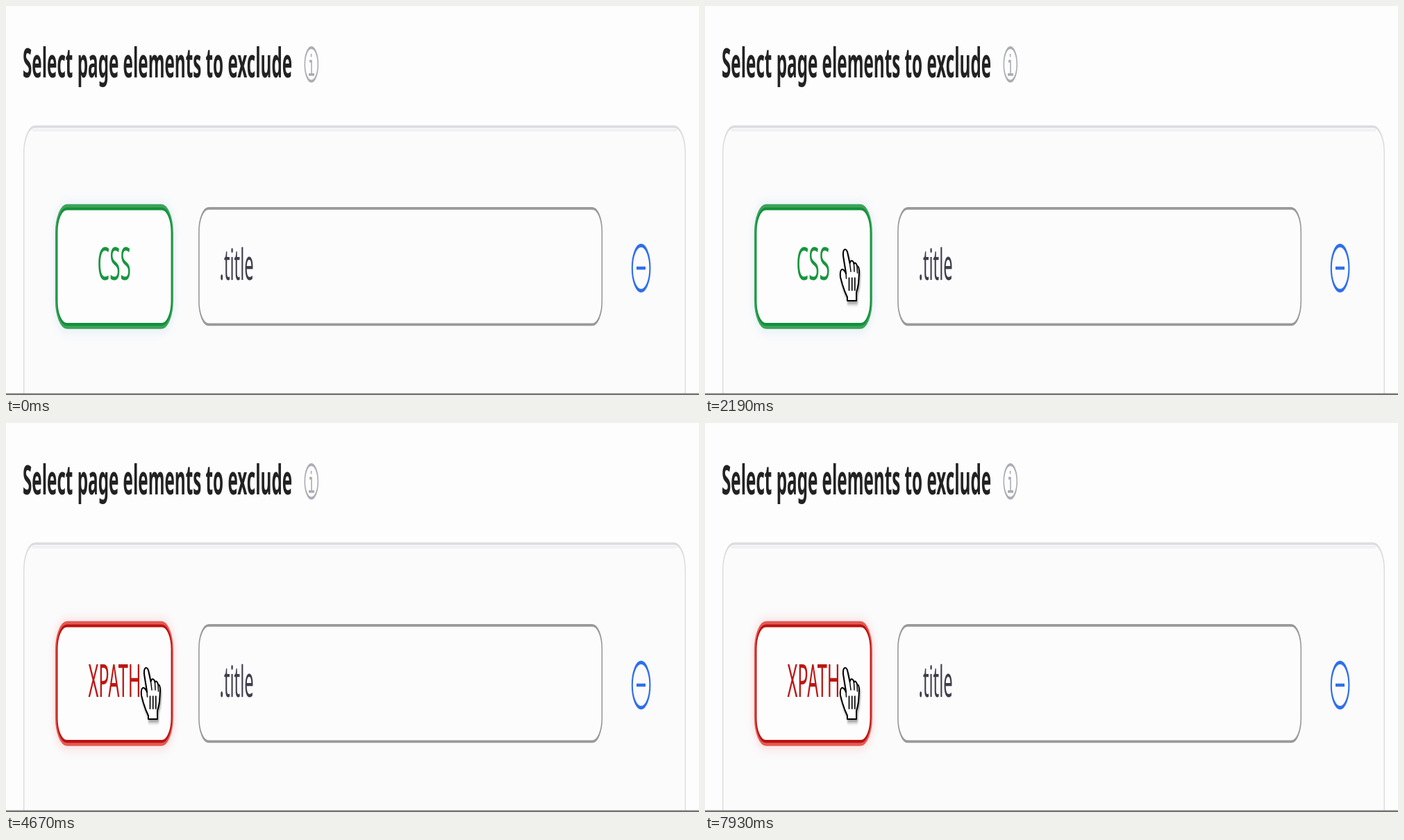
An HTML page for the animation above (8 s loop, 998 by 561 pixels).

```html
<!DOCTYPE html>
<html lang="en">
<head>
<meta charset="utf-8">
<title>Exclude elements</title>
<style>
  html, body { margin: 0; width: 100%; height: 100%; overflow: hidden; background: #fdfdfd; }
  svg { display: block; width: 100%; height: 100%; }
  text { font-family: "Noto Sans", "Open Sans", sans-serif; }
</style>
</head>
<body>
<svg viewBox="0 0 998 561" preserveAspectRatio="none">
  <defs>
    <filter id="soft" x="-20%" y="-40%" width="140%" height="180%">
      <feGaussianBlur stdDeviation="4.5 3.5"/>
    </filter>
    <filter id="drop" x="-50%" y="-30%" width="200%" height="170%">
      <feDropShadow dx="1" dy="4" stdDeviation="1.3 2.4" flood-opacity=".4"/>
    </filter>
  </defs>
  <rect width="998" height="561" fill="#fdfdfd"/>

  <!-- The interface is squeezed sideways, so boxes share one vertical scale -->
  <g transform="scale(1 2.4)" fill="none">
    <rect x="25.7" y="72.5" width="952.6" height="200" rx="16" fill="#fbfbfc" stroke="#dcdce0" stroke-width="1.5"/>
    <path d="M38 74.600H966" stroke="#f1f1f4" stroke-width="1.6"/>
    <rect x="277.9" y="121.6" width="580.4" height="69.8" rx="14" fill="#fcfcfd" stroke="#999" stroke-width="1.6"/>
    <ellipse cx="439.8" cy="35.1" rx="9.5" ry="10.1" stroke="#abadb5" stroke-width="1.6"/>
    <path d="M437 33.2H440V41M436 41.2H444M439.6 28.8V30.6" stroke="#abadb5" stroke-width="1.6"/>
    <ellipse cx="914.6" cy="157.5" rx="12.8" ry="13.6" stroke="#2f6fec" stroke-width="2.1"/>
    <path d="M908 157.5H921" stroke="#2f6fec" stroke-width="1.9"/>
    <rect id="glow" x="69" y="118.5" width="174" height="77" rx="18" filter="url(#soft)" opacity=".26"/>
    <rect x="73" y="121" width="166" height="71.5" rx="15" fill="#fdfdfd"/>
    <rect id="outer" x="72.2" y="120.4" width="167.4" height="72.4" rx="16" stroke-width="2.6"/>
    <rect id="inner" x="73.6" y="121.9" width="164.8" height="69.4" rx="14" stroke-width="1.7"/>
  </g>

  <g id="labels"></g>
  <rect y="558.6" width="998" height="2.4" fill="#737373"/>

  <g id="cursor">
    <path id="arrow" filter="url(#drop)" d="M0 0V47L4.5 39L9 68L14.5 63L10 38H16.5Z"
      fill="#000" stroke="#fff" stroke-width="1.4"/>
    <g id="hand" filter="url(#drop)" stroke="#000" stroke-linejoin="round" stroke-linecap="round">
      <path d="M-5 35L-9 10Q-9.500 2 -6.500 1Q-3.500 1 -2.500 7L.5 21Q3 14 6 20L6.500 22Q9 18 11 25Q14 25 14 34L13 50Q12 57 10 63V75H-3V70Q-7 62 -10 52L-13 41Q-14 32 -11 30Q-8 29 -5 36Z"
        fill="#fff" stroke-width="2"/>
      <path d="M.5 21L2 33M6.500 22L7 33M11 26L11.500 35M-5 35L-4.500 43" fill="none" stroke-width="1.5"/>
      <path d="M-.5 42V60M3.700 42V60M7.800 42V60" fill="none" stroke-width="1.7"/>
    </g>
  </g>
</svg>
<script>
  const LOOP = 8000;
  const ENTER = 530, REST = 1130, HOVER = 1370;
  const FIRST_CLICK = 2560, CLICK_GAP = 2520;
  const GREEN = { outer: "#3da35a", inner: "#11913a", glow: "#a5c9dc" };
  const RED = { outer: "#e25a54", inner: "#bd100d", glow: "#f0817c" };
  const $ = id => document.getElementById(id);

  function label(text, x, y, size, tall, fill, weight = 400) {
    const el = document.createElementNS("http://www.w3.org/2000/svg", "text");
    el.textContent = text;
    el.setAttribute("transform", `translate(${x} ${y}) scale(1 ${tall})`);
    el.setAttribute("font-size", size);
    el.setAttribute("font-weight", weight);
    el.setAttribute("fill", fill);
    return $("labels").appendChild(el);
  }

  label("Select page elements to exclude", 24, 102.5, 24.25, 2.42, "#222", 700);
  label(".title", 307.5, 395, 23.8, 2.57, "#3e3e4c");
  const css = label("CSS", 131.5, 394.5, 28, 2.33, "#18953f");
  const xpath = label("XPATH", 118.5, 394.5, 25.3, 2.58, "#bd1714");

  const show = (el, on) => el.setAttribute("visibility", on ? "visible" : "hidden");
  const clamp = v => Math.max(0, Math.min(1, v));

  function draw(t) {
    const clicks = Math.max(0, Math.floor((t - FIRST_CLICK) / CLICK_GAP) + 1);
    const red = clicks % 2 === 1;
    const skin = red ? RED : GREEN;
    $("outer").setAttribute("stroke", skin.outer);
    $("inner").setAttribute("stroke", skin.inner);
    $("glow").setAttribute("fill", skin.glow);
    show(css, !red);
    show(xpath, red);

    // The pointer glides in from below and settles on the button
    const left = Math.pow(1 - clamp((t - ENTER) / (REST - ENTER)), 3);
    const x = 208 + 80 * left;
    const y = 350 + 215 * left + (clicks ? 2 : 0);
    $("cursor").setAttribute("transform", `translate(${x} ${y})`);
    show($("arrow"), t >= ENTER && t < HOVER);
    show($("hand"), t >= HOVER);
  }

  const start = performance.now();
  function tick() {
    draw((performance.now() - start) % LOOP);
    requestAnimationFrame(tick);
  }
  draw(0);
  requestAnimationFrame(tick);
</script>
</body>
</html>
```
